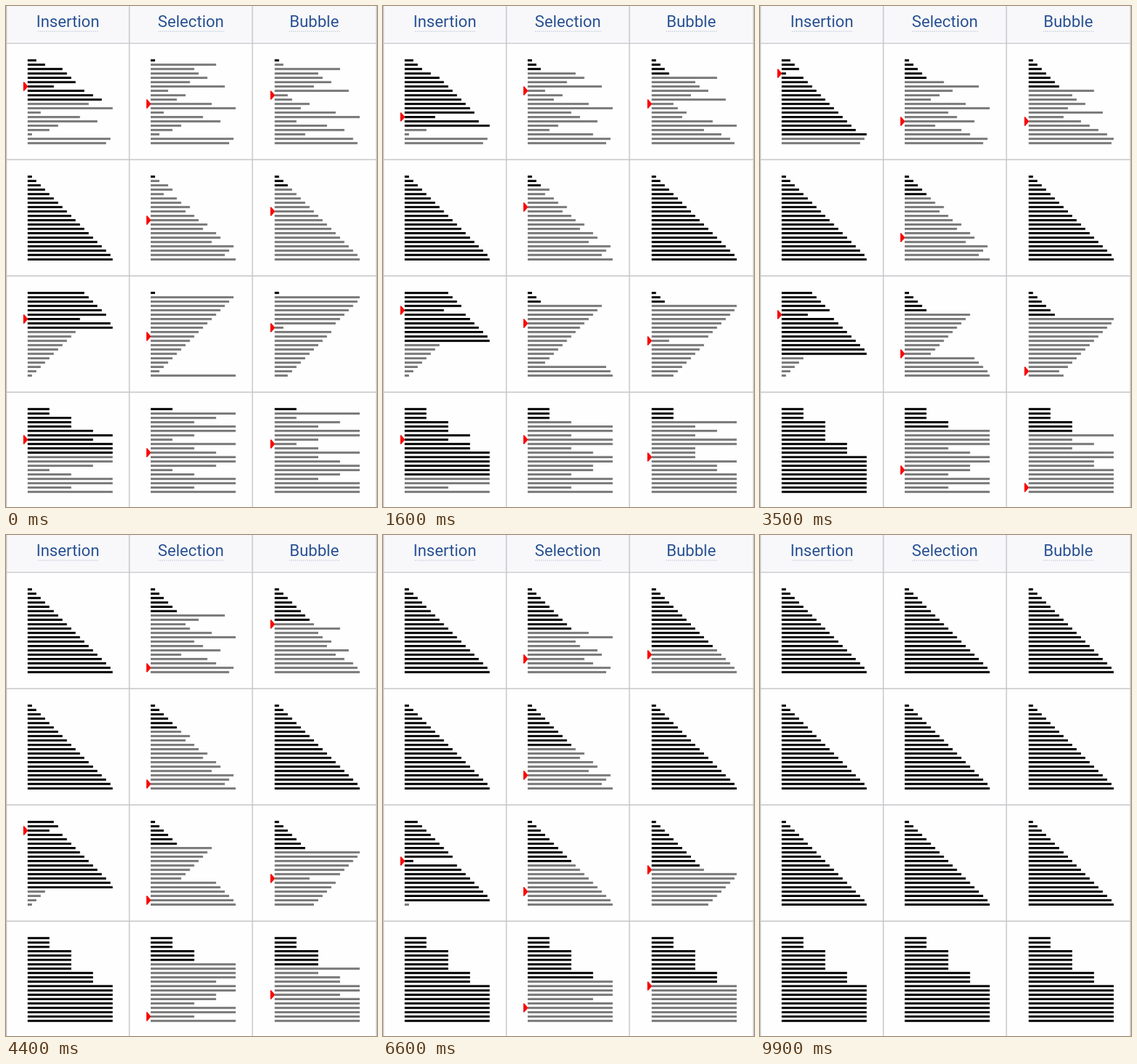
Animation of 600x811 px, one loop 10 s. Source, as an HTML page:

```html
<!DOCTYPE html>
<html lang="en">
<head>
<meta charset="utf-8">
<title>Sorting algorithms</title>
<style>
  html, body { margin: 0; width: 100%; height: 100%; overflow: hidden; background: #fefefe; }
  svg { display: block; width: 100%; height: 100%; }
  text { font: 400 26px Roboto, "Open Sans", sans-serif; fill: #2a5394; text-anchor: middle; }
  .grid { fill: none; stroke: #c6c6ca; stroke-width: 1.7; }
  .dots { fill: none; stroke: #c3cbd9; stroke-width: 1.5; stroke-dasharray: 1.6 1.6; }
  .sorted { fill: #000; }
  .open { fill: #787878; }
  .mark { fill: #f80808; }
</style>
</head>
<body>
<svg id="stage" viewBox="0 0 600 811">
  <rect width="600" height="60" fill="#f8f8fa"/>
  <path class="grid" d="M.7 0V811M199.5 0V811M398.5 0V811M599.2 0V811M0 60.5H600M0 248.6H600M0 436.8H600M0 625.2H600"/>
  <text x="100" y="34">Insertion</text>
  <text x="299" y="34">Selection</text>
  <text x="498.5" y="34">Bubble</text>
  <path class="dots" d="M51.5 41H150M246 41H353M458 41H540"/>
</svg>
<script>
const N = 20, UNIT = 7.05, BAR = 3.5, MAX_WIDTH = 137.5;
const FRAME_MS = 100, FRAMES = 100, FIRST_STEP = 30, STEPS_PER_FRAME = 2;
const LEFT = [35, 234, 434.5];
const TOP = 88, ROW_HEIGHT = 188.2;

const inputs = [
  [2, 15, 10, 11, 13, 9, 17, 4, 8, 6, 14, 20, 3, 12, 16, 7, 5, 1, 19, 18],
  [1, 2, 4, 5, 3, 6, 7, 9, 8, 10, 11, 13, 12, 15, 16, 14, 19, 18, 17, 20],
  Array.from({ length: N }, (_, i) => N - i),
  [4, 1, 3, 2, 4, 4, 2, 1, 4, 2, 3, 4, 4, 3, 1, 2, 4, 4, 2, 4].map(v => v * 5)
];

const swap = (a, i, j) => { [a[i], a[j]] = [a[j], a[i]]; };

// Each sort yields [sorted count, marker index] after every operation.
function* insertion(a) {
  for (let i = 1; i < N; i++) {
    let k = i;
    while (k > 0) {
      const moved = a[k] < a[k - 1];
      if (moved) swap(a, k, --k);
      yield [i + 1, k];
      if (!moved) break;
    }
  }
}

function* selection(a) {
  for (let i = 0; i < N - 1; i++) {
    let min = i;
    for (let j = i; j < N; j++) {
      if (a[j] < a[min]) min = j;
      yield [i, j];
    }
    swap(a, i, min);
  }
}

function* bubble(a) {
  let i = 0;
  while (i < N) {
    let last = N;
    for (let j = N - 1; j > i; j--) {
      if (a[j] < a[j - 1]) {
        swap(a, j, j - 1);
        last = j;
      }
      yield [i, j - 1];
    }
    i = last;
  }
}

function record(sort, input) {
  const a = [...input], states = [];
  for (const [sorted, mark] of sort(a)) states.push({ a: [...a], sorted, mark });
  states.push({ a, sorted: N, mark: -1 });
  return states;
}

const stage = document.getElementById("stage");

function addPath(parent, name) {
  const path = document.createElementNS(stage.namespaceURI, name === "g" ? "g" : "path");
  if (name !== "g") path.setAttribute("class", name);
  return parent.appendChild(path);
}

function makePanel(sort, input, x, y) {
  const group = addPath(stage, "g");
  group.setAttribute("transform", `translate(${x} ${y})`);
  return {
    states: record(sort, input),
    sorted: addPath(group, "sorted"),
    open: addPath(group, "open"),
    mark: addPath(group, "mark")
  };
}

const panels = inputs.flatMap((input, row) =>
  [insertion, selection, bubble].map((sort, col) =>
    makePanel(sort, input, LEFT[col], TOP + row * ROW_HEIGHT)));

const bar = (value, i) => {
  const w = Math.min(value * UNIT, MAX_WIDTH);
  return `M0 ${i * UNIT - BAR / 2}h${w}v${BAR}h${-w}z`;
};

function drawPanel(panel, step) {
  const { a, sorted, mark } = panel.states[Math.min(step, panel.states.length) - 1];
  const bars = a.map(bar);
  panel.sorted.setAttribute("d", bars.slice(0, sorted).join(""));
  panel.open.setAttribute("d", bars.slice(sorted).join(""));
  panel.mark.setAttribute("d", mark < 0 ? "" : `M-7 ${mark * UNIT - 7.2}h1.6l6 7.2l-6 7.2h-1.6z`);
}

let shown = -1;
function tick() {
  const frame = Math.floor(performance.now() / FRAME_MS) % FRAMES;
  if (frame !== shown) {
    shown = frame;
    panels.forEach(p => drawPanel(p, FIRST_STEP + frame * STEPS_PER_FRAME));
  }
  requestAnimationFrame(tick);
}
tick();
</script>
</body>
</html>
```
